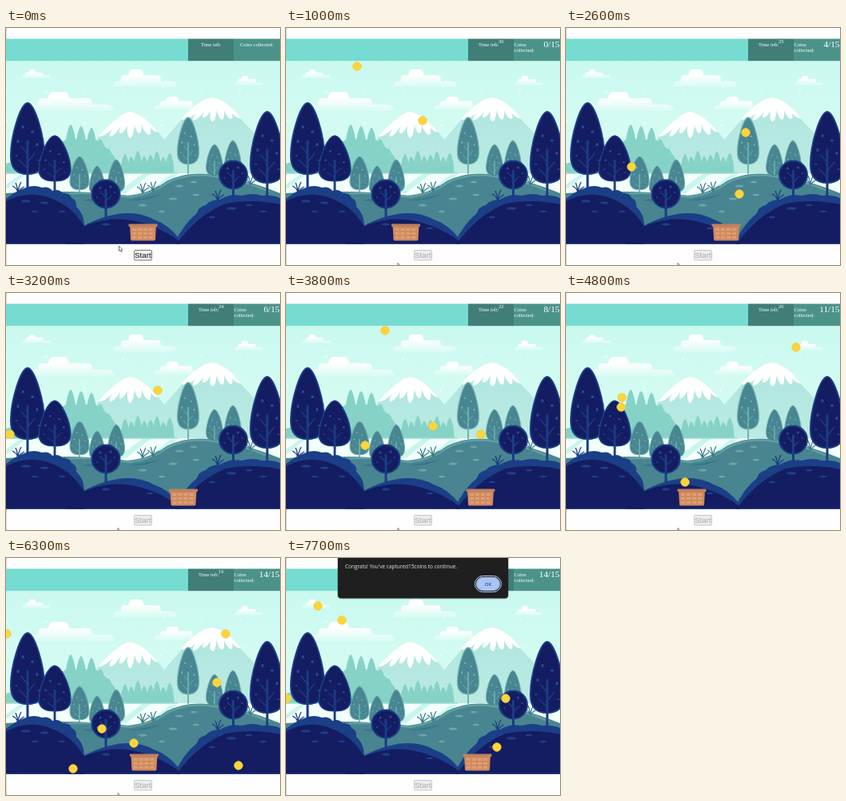
Recreate the animation shown at these times as an HTML page. Size 343 by 297 pixels, loop 8000 ms.

```html
<!DOCTYPE html>
<html lang="en">
<head>
<meta charset="utf-8">
<title>Coin catcher</title>
<style>
html, body { margin: 0; width: 100%; height: 100%; overflow: hidden; background: #fefefe; }
svg { display: block; width: 343px; height: 297px; }
.hud { font: 6.5px "Liberation Serif", serif; fill: #fff; }
.near { --body: #141c62; --edge: #1a3c84; --spot: #24509a; }
.mid { --body: #488692; --edge: #6fb0af; --spot: #78b9b5; }
.mid .trunk { stroke: #356f83; }
.leaf { fill: var(--body); stroke: var(--edge); stroke-width: 2; }
.trunk { fill: none; stroke: var(--edge); stroke-width: 3; stroke-linecap: round; }
.twig { stroke-width: 1.5; }
.spot { fill: var(--spot); }
</style>
</head>
<body>
<svg viewBox="0 0 343 297">
  <defs>
    <linearGradient id="sky" x2="0" y2="1">
      <stop stop-color="#c9f9ef"/><stop offset=".6" stop-color="#dafcf4"/>
    </linearGradient>
    <linearGradient id="mist" x2="0" y2="1">
      <stop offset=".3" stop-color="#fff"/><stop offset="1" stop-color="#fff" stop-opacity=".2"/>
    </linearGradient>
    <linearGradient id="rock" x2="0" y2="1">
      <stop stop-color="#aee5dd"/><stop offset="1" stop-color="#bbebe3"/>
    </linearGradient>
    <clipPath id="field"><path d="M0 41.5H343V270.5H0Z"/></clipPath>
    <path id="crown" d="M0 0C9 1 21 41 21 66C21 83 12 89 0 89S-21 83-21 66C-21 41-9 1 0 0Z"/>
    <g id="tall">
      <use href="#crown" class="leaf"/>
      <path class="trunk" d="M0 48V107"/>
      <path class="trunk twig" d="M0 64L-8 54M0 74L9 63M0 82L-10 72"/>
      <g class="spot">
        <ellipse cx="-6" cy="30" rx="1.5" ry="2"/><ellipse cx="6" cy="36" rx="2" ry="1.5"/>
        <ellipse cx="-12" cy="48" rx="1.5" ry="2"/><ellipse cx="12" cy="52" rx="1.5" ry="2"/>
        <ellipse cx="-14" cy="66" rx="1.5" ry="1"/><ellipse cx="14" cy="72" rx="1.5" ry="1"/>
      </g>
    </g>
    <g id="round">
      <circle class="leaf" r="17.5"/>
      <path class="trunk" d="M0-5V28"/>
      <path class="trunk twig" d="M0 4L-7-3M0 9L7 2"/>
      <g class="spot"><circle cx="-7" cy="-8" r="1.5"/><circle cx="6" cy="-9" r="1.5"/><circle cx="11" cy="-2" r="1"/><circle cx="-11" cy="4" r="1"/></g>
    </g>
    <path id="grass" d="M0 0Q-2-6-7-8M0 0Q-1-8-3-12M0 0Q1-8 4-13M0 0Q3-5 8-7" fill="none" stroke-width="1.3"/>
    <path id="cloud" fill="url(#mist)" d="M0 24Q0 16 6 16H13Q13 8 18 8H26Q27 0 32 0H46Q51 0 52 8H76Q81 8 81 16H100Q108 16 108 24Z"/>
  </defs>

  <path d="M.5 0V297" stroke="#d8d8d8"/>
  <path d="M0 13.5H228V41.5H0Z" fill="#76dbd0"/>
  <path d="M228 13.5H285V41.5H228Z" fill="#407e77"/>
  <path d="M285 13.5H343V41.5H285Z" fill="#4b9389"/>

  <g clip-path="url(#field)">
    <path d="M0 41H343V271H0Z" fill="url(#sky)"/>
    <g id="stars" fill="#fff"></g>
    <use href="#cloud" x="27" y="80"/>
    <use href="#cloud" transform="translate(134 52) scale(.74 .92)"/>
    <use href="#cloud" transform="translate(20 52) scale(.33 .46)"/>
    <use href="#cloud" transform="translate(286 60) scale(.33 .5)"/>
    <use href="#cloud" transform="translate(185 86) scale(.6 .7)"/>

    <path d="M85 184L116 136Q143 106 155 105Q170 106 190 130L235 184Z" fill="url(#rock)"/>
    <path d="M160 184L218 117Q240 88 257 87Q273 88 294 114L343 166V184Z" fill="url(#rock)"/>
    <g fill="#fff">
      <path d="M115 136Q143 106 155 105Q170 106 190 130Q187 132 181 125Q182 135 178 134Q173 131 170 121Q170 133 166 132Q162 128 161 121Q159 138 155 138Q151 136 152 123Q146 134 142 132Q141 128 145 121Q135 137 130 136Q128 133 134 126Q122 137 115 136Z"/>
      <path d="M219 114Q242 88 257 87Q274 88 294 113Q289 114 283 107Q285 115 281 114Q276 111 273 103Q274 115 270 115Q265 112 264 103Q262 118 258 117Q254 115 256 104Q250 114 246 112Q245 109 249 103Q239 117 234 116Q233 112 238 107Q226 117 219 114Z"/>
    </g>
    <g id="forest" fill="#86d2c6">
      <path d="M0 182V170Q40 160 75 140L112 140Q136 154 146 182Z"/>
    </g>
    <path d="M0 182H343V212H0Z" fill="#f3fffb"/>
    <path d="M138 207L172 182H182L150 207ZM176 207L206 184H214L190 207ZM0 196L20 182H27L0 202Z" fill="#c9f5ed"/>
    <path d="M0 182H215" stroke="#9bddd2" stroke-width="1.5"/>

    <g class="mid">
      <use href="#tall" transform="translate(92 161) scale(.57 .47)"/>
      <use href="#tall" transform="translate(114 173) scale(.46 .4)"/>
      <use href="#tall" transform="translate(138 165) scale(.5 .46)"/>
      <use href="#tall" transform="translate(228 112) scale(.64 .66)"/>
      <use href="#tall" transform="translate(261 146) scale(.5 .44)"/>
      <use href="#tall" transform="translate(284 141) scale(.5 .5)"/>
    </g>
    <path d="M0 207Q90 202 153 210Q181 207 201 192Q228 179 260 184Q296 188 343 207V271H0Z" fill="#488590"/>
    <path d="M73 208Q106 205 155 212Q185 207 202 194Q228 181 260 186Q295 190 330 205" fill="none" stroke="#65a3a4" stroke-width="2"/>
    <path d="M151 216Q184 212 198 207Q176 218 151 216ZM95 216Q115 211 145 216Q115 220 95 216Z" fill="#39758a"/>
    <g fill="#6ba7a8">
      <ellipse cx="217" cy="198" rx="5" ry="1.5"/><ellipse cx="235" cy="193" rx="4" ry="1.3"/>
      <ellipse cx="209" cy="214" rx="5" ry="1.5"/><ellipse cx="238" cy="209" rx="4" ry="1.3"/>
      <ellipse cx="171" cy="222" rx="5" ry="1.5"/><ellipse cx="195" cy="230" rx="4" ry="1.3"/>
    </g>
    <g stroke="#3b7b8b"><use href="#grass" x="171" y="207"/><use href="#grass" x="184" y="205"/><use href="#grass" x="306" y="197"/></g>

    <g stroke="#1a3c84"><use href="#grass" x="15" y="206"/><use href="#grass" x="265" y="216"/></g>
    <g fill="#1b3f87">
      <path d="M-5 218Q10 205 25 200Q35 196 45 200Q54 198 58 204Q66 201 71 207Q80 206 82 213Q89 216 88 224Q97 232 98 246V275H-5Z"/>
      <path d="M90 252Q115 237 140 233Q165 229 185 240Q203 246 217 264V275H90Z"/>
      <path d="M212 268Q222 246 239 232Q241 224 250 222Q256 215 268 215Q280 207 295 210Q310 206 320 210Q335 209 345 214V275H212Z"/>
    </g>
    <g class="near">
      <use href="#tall" x="27" y="94"/>
      <use href="#tall" transform="translate(61 135) scale(.94 .64)"/>
      <use href="#tall" x="327" y="105"/>
      <use href="#round" x="125" y="208"/>
      <use href="#round" x="284.5" y="184"/>
    </g>
    <g fill="#141c62">
      <path d="M-5 220Q20 205 45 210Q80 218 98 249V275H-5Z"/>
      <path d="M70 275L96 249Q125 237 150 240Q185 244 217 267V275Z"/>
      <path d="M214 270Q240 234 275 220Q310 213 348 222V275H214Z"/>
    </g>
    <g fill="#1d4189">
      <ellipse cx="25" cy="217" rx="6" ry="1.6"/><ellipse cx="48" cy="219" rx="5" ry="1.5"/>
      <ellipse cx="36" cy="230" rx="4" ry="1.2"/><ellipse cx="70" cy="230" rx="4" ry="1.2"/>
      <ellipse cx="125" cy="246" rx="5" ry="1.5"/><ellipse cx="180" cy="251" rx="4" ry="1.2"/>
      <ellipse cx="282" cy="226" rx="6" ry="1.6"/><ellipse cx="304" cy="222" rx="4" ry="1.3"/>
      <ellipse cx="258" cy="237" rx="4" ry="1.3"/><ellipse cx="322" cy="230" rx="4" ry="1.2"/>
    </g>
    <g id="basket">
      <path d="M2 247H35L34 265Q34 266.5 32 266.5H5Q3 266.5 3 265Z" fill="#d08a5f"/>
      <path d="M5 252.5H33M5 257.5H33M5 262.5H33" stroke="#dd9e74" stroke-width="3" stroke-dasharray="5 2"/>
      <rect x=".5" y="245.5" width="36" height="3.5" rx="1" fill="#c08060"/>
    </g>
    <g id="coins" fill="#fcd53b" stroke="#f8cc38"></g>
  </g>

  <g class="hud">
    <text id="timeLabel" y="23">Time left:</text>
    <text id="time" x="266" y="19"></text>
    <text id="idle" x="314" y="23" text-anchor="middle">Coins collected:</text>
    <g id="tally">
      <text x="285.5" y="23">Coins</text><text x="285.5" y="30">collected:</text>
      <text id="score" x="342.5" y="23.5" font-size="11.3" text-anchor="end"></text>
    </g>
  </g>

  <g id="button">
    <rect x="160.5" y="278.5" width="22" height="12.5" rx="1.5" stroke-width="1"/>
    <text x="171.3" y="288.2" text-anchor="middle" font-family="Liberation Sans, sans-serif" font-size="9.8">Start</text>
  </g>

  <g id="dialog">
    <rect x="64" y="-8" width="215" height="59.5" rx="5" fill="#000" opacity=".25"/>
    <rect x="65" y="-8" width="213" height="58.5" rx="4" fill="#1f1f20"/>
    <text x="74" y="13.3" font-family="Open Sans, sans-serif" font-size="6.5" fill="#e8e8e8">Congrats! You've captured15coins to continue.</text>
    <rect x="236.5" y="22.5" width="33" height="20" rx="10" fill="none" stroke="#c2d5fb"/>
    <rect x="238" y="24" width="30" height="17" rx="8.5" fill="#a9c3f3"/>
    <text x="253" y="34.8" text-anchor="middle" font-family="Open Sans, sans-serif" font-size="6" fill="#0b2a66">OK</text>
  </g>
  <path id="cursor" d="M0 0V6.5L1.5 5.2L2.6 7.6L3.6 7.1L2.6 4.9H4.5Z" fill="#fff" stroke="#444" stroke-width=".7"/>
</svg>
<script>
const LOOP = 8000, STEP = 100, START = 800, END = 6600, FALL = 0.27;
const $ = id => document.getElementById(id);
const show = (id, on) => { $(id).style.display = on ? "" : "none"; };
const moveTo = (id, x, y) => $(id).setAttribute("transform", `translate(${x} ${y})`);

// Each wave: a time, then the x and y of coins in the air at that time.
const waves = [
  [1200, [171, 170]],
  [1600, [310, 66], [152, 118], [261, 137], [89, 210]],
  [2100, [150, 155]],
  [2600, [225, 131], [82, 174], [217, 208]],
  [3100, [5, 150], [190, 95]],
  [3800, [124, 47], [184, 167], [244, 177], [99, 191]],
  [4300, [205, 160]],
  [4800, [288, 68], [70, 131], [69, 143], [149, 237]],
  [5600, [160, 43], [84, 75], [291, 71], [269, 212], [136, 239]],
  [6100, [120, 160]],
  [END, [40, 60], [70, 78], [1, 176], [275, 176], [264, 237]]
];
const coins = waves.flatMap(([at, ...spots]) => spots.map(([x, y]) => ({ at, x, y })));
const catches = [1500, 1800, 2100, 2500, 2800, 3100, 3400, 3700, 4100, 4400, 4700, 5000, 5400, 6100];
const basketPath = [[800, 153], [1600, 67], [2600, 182], [3800, 225], [4800, 139], [5600, -1], [END, 221]];
const cursorX = [[0, 141.5], [200, 168], [700, 168], [900, 140], [6800, 140], [7300, 256]];
const cursorY = [[0, 273], [200, 283], [700, 283], [900, 294.5], [6800, 294.5], [7300, 32]];

function along(keys, t) {
  if (t <= keys[0][0]) return keys[0][1];
  const next = keys.findIndex(key => key[0] > t);
  if (next < 0) return keys.at(-1)[1];
  const [t0, v0] = keys[next - 1], [t1, v1] = keys[next];
  return v0 + (v1 - v0) * (t - t0) / (t1 - t0);
}

function plant(x, top, bottom, width) {
  return `<use href="#crown" transform="translate(${x} ${top}) scale(${width / 42} ${(bottom - top) / 89})"/>`;
}

function buildScenery() {
  let trees = "";
  [[81, 121], [94, 123], [107, 125], [118, 139], [128, 151]].forEach(([x, top]) => trees += plant(x, top, 196, 19));
  for (let i = 0; i < 8; i++) trees += plant(149 + i * 8, 158 + 4 * Math.sin(i * 2.3), 188, 11);
  $("forest").innerHTML += trees;
  let stars = "";
  for (let i = 0; i < 26; i++) stars += `<circle cx="${i * 97 % 339}" cy="${48 + i * 37 % 75}" r="${0.5 + i % 3 * 0.2}"/>`;
  $("stars").innerHTML = stars;
}

function drawButton(t) {
  const [box, label] = $("button").children;
  const disabled = t >= 600, pressed = t >= 400, hover = t >= 200;
  box.setAttribute("fill", disabled ? "#ececec" : pressed ? "#f5f5f5" : hover ? "#e5e5e5" : "#efefef");
  box.setAttribute("stroke", disabled ? "#c8c8c8" : "#777");
  label.setAttribute("fill", disabled ? "#aaa" : "#111");
}

function draw(t) {
  const game = Math.min(t, END), playing = t >= START;
  const basket = along(basketPath, game);
  moveTo("basket", basket, 0);
  $("coins").innerHTML = !playing ? "" : coins.map(({ at, x, y }) => {
    const now = y + FALL * (game - at);
    const caught = now > 240 && Math.abs(x - basket - 18) < 22;
    return now > 36 && now < 271 && !caught ? `<circle cx="${x}" cy="${now}" r="5.2"/>` : "";
  }).join("");

  $("timeLabel").setAttribute("x", playing ? 241 : 244);
  $("time").textContent = playing ? 30 - Math.floor((game - 700) * 0.00264) : "";
  $("score").textContent = catches.filter(at => at <= game).length + "/15";
  show("idle", !playing);
  show("tally", playing);
  drawButton(t);
  show("dialog", t >= END);
  show("cursor", t < 7600);
  moveTo("cursor", along(cursorX, t), along(cursorY, t));
}

let last = -1;
const began = performance.now();
function frame() {
  const t = Math.floor((performance.now() - began) % LOOP / STEP) * STEP;
  if (t !== last) draw(last = t);
  requestAnimationFrame(frame);
}
buildScenery();
frame();
</script>
</body>
</html>
```
